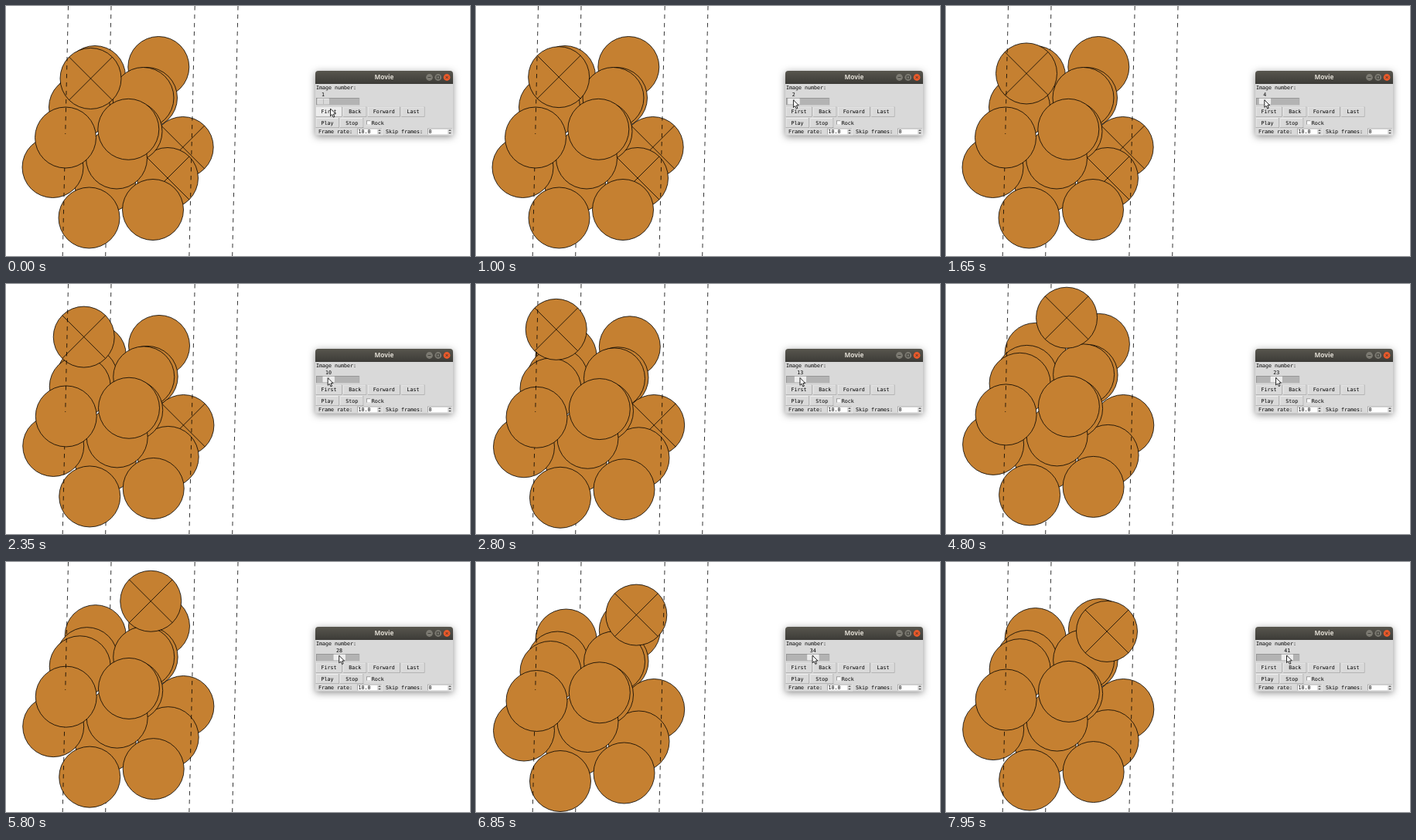
An HTML page with a canvas that plays this animation: 600 by 324 pixels, repeating every 8 s.

```html
<!DOCTYPE html>
<html lang="en">
<head>
<meta charset="utf-8">
<title>Movie</title>
<style>
html, body { margin: 0; width: 600px; height: 324px; overflow: hidden; background: #fff; }
canvas { display: block; }
</style>
</head>
<body>
<canvas id="stage" width="600" height="324"></canvas>
<script>
const ctx = document.getElementById('stage').getContext('2d');
const LOOP = 8000, STEP = 50, R = 39.5, COPPER = '#c58031';
const MONO = '6.65px "DejaVu Sans Mono", monospace';

// [time in ms, image number] while the slider is dragged
const DRAG = [[0, 1], [550, 1], [1650, 4], [3400, 18], [4800, 23], [6850, 34], [7950, 41]];

// rest positions, back to front; swing scales how strongly an atom vibrates
const BEHIND = [
  { x: 115, y: 91 },
  { x: 197.3, y: 79 },
  { x: 128, y: 229 },
  { x: 104, y: 120 },
  { x: 182, y: 119 },
  { x: 95, y: 131, swing: 2 },
  { x: 177.5, y: 119, swing: 1.5 },
  { x: 228.7, y: 183, swing: 0, crossUntil: 20 }
];
const FRONT_LEFT = { x: 77, y: 170.5 };
const BEFORE = [
  { x: 209, y: 223, crossUntil: 8 },
  { x: 162.5, y: 162.5 },
  { x: 143, y: 197.5 },
  { x: 60.5, y: 209 },
  { x: 107.5, y: 274.5 },
  { x: 190, y: 264 },
  FRONT_LEFT,
  { x: 158.3, y: 159.8 }
];

const clamp = (v, lo, hi) => Math.min(hi, Math.max(lo, v));
const ease = u => (1 - Math.cos(Math.PI * clamp(u, 0, 1))) / 2;
const bump = (n, center, width) => Math.exp(-(((n - center) / width) ** 2));

function along(points, t) {
  const i = points.findIndex(([time]) => time > t);
  if (i < 0) return points[points.length - 1][1];
  const [t0, v0] = points[i - 1], [t1, v1] = points[i];
  return v0 + (v1 - v0) * (t - t0) / (t1 - t0);
}

// the loose atom climbs over the cluster and settles on the right
const traveller = n => ({
  x: 154 + 54 * Math.sin(clamp((n - 22.7) / 8, -Math.PI / 2, Math.PI / 2)) + 9.5 * Math.exp((1 - n) / 3.5),
  y: 43.5 + 27 * (1 - Math.cos((n - 22) / 8))
});

// the others vibrate, then sink once it has passed
function place({ x, y, swing = 1 }, n) {
  const vibration = 2.6 * bump(n, 13, 3) - 3 * bump(n, 19, 4) + 1.5 * bump(n, 34, 4);
  return {
    x: x + 0.6 * ease((n - 4) / 10) + 0.9 * (bump(n, 13, 3) + bump(n, 34, 4)),
    y: y + 8 * ease((n - 23) / 10) + swing * vibration
  };
}

function line(x1, y1, x2, y2) {
  ctx.beginPath();
  ctx.moveTo(x1, y1);
  ctx.lineTo(x2, y2);
  ctx.stroke();
}

function disc(x, y, r, color) {
  ctx.beginPath();
  ctx.arc(x, y, r, 0, Math.PI * 2);
  ctx.fillStyle = color;
  ctx.fill();
}

function ball({ x, y }, crossed) {
  disc(x, y, R, COPPER);
  ctx.stroke();
  if (crossed) {
    const d = R * Math.SQRT1_2;
    line(x - d, y - d, x + d, y + d);
    line(x - d, y + d, x + d, y - d);
  }
}

function cellEdge(top, from = 0, to = 324) {
  const xAt = y => top - 7.3 * y / 324;
  ctx.setLineDash([5.5, 5.5]);
  ctx.lineDashOffset = from;
  line(xAt(from), from, xAt(to), to);
  ctx.setLineDash([]);
}

function cluster(n) {
  ctx.strokeStyle = '#000';
  ctx.lineWidth = 0.8;
  const draw = atom => ball(place(atom, n), n <= atom.crossUntil);
  cellEdge(136);
  cellEdge(300);
  BEHIND.forEach(draw);
  ball(traveller(n), true);
  BEFORE.forEach(draw);
  cellEdge(80.5, 0, 166);
  cellEdge(80.5, place(FRONT_LEFT, n).y + R);
  cellEdge(244.2);
}

function rect(x, y, w, h, color) {
  ctx.fillStyle = color;
  ctx.fillRect(x, y, w, h);
}

function bevel(x, y, w, h, face, light = '#f2f2f2', dark = '#9a9a9a') {
  rect(x, y, w, h, dark);
  rect(x, y, w - 0.8, h - 0.8, light);
  rect(x + 0.8, y + 0.8, w - 1.6, h - 1.6, face);
}

function label(text, x, y, align = 'left', font = MONO, color = '#000') {
  ctx.font = font;
  ctx.textAlign = align;
  ctx.textBaseline = 'middle';
  ctx.fillStyle = color;
  ctx.fillText(text, x, y);
}

function buttonRow(names, y, hovered) {
  let x = 400.6;
  for (const name of names) {
    const w = 14 + name.length * 4;
    bevel(x, y, w, 13, name === hovered ? '#ececec' : '#d9d9d9');
    label(name, x + w / 2, y + 6.8, 'center');
    x += w + 1.6;
  }
}

function spinbox(text, x) {
  bevel(x, 158.6, 33, 8.6, '#fff', '#999', '#eee');
  rect(x + 26, 159.4, 6, 7, '#d9d9d9');
  ctx.fillStyle = '#333';
  for (const dir of [-1, 1]) {
    const y = 162.9 + dir * 1.1;
    ctx.beginPath();
    ctx.moveTo(x + 27.2, y);
    ctx.lineTo(x + 30.8, y);
    ctx.lineTo(x + 29, y + dir * 1.6);
    ctx.fill();
  }
  label(text, x + 1.5, 163.2);
}

function titleBar() {
  ctx.save();
  ctx.shadowColor = 'rgba(0,0,0,.45)';
  ctx.shadowBlur = 10;
  ctx.shadowOffsetY = 2;
  ctx.fillStyle = '#d9d9d9';
  ctx.beginPath();
  ctx.roundRect(400, 84, 178, 83.5, [4, 4, 0, 0]);
  ctx.fill();
  ctx.restore();

  const shade = ctx.createLinearGradient(0, 84, 0, 101);
  shade.addColorStop(0, '#58564e');
  shade.addColorStop(1, '#3c3b37');
  ctx.fillStyle = shade;
  ctx.beginPath();
  ctx.roundRect(400, 84, 178, 17, [4, 4, 0, 0]);
  ctx.fill();
  label('Movie', 489, 93, 'center', 'bold 8.3px "Open Sans", sans-serif', '#dfdbd2');

  ['#7c7a72', '#7c7a72', '#e9592a'].forEach((color, i) => disc(547.5 + i * 11.3, 92.5, 4.4, color));
  ctx.strokeStyle = '#35342f';
  ctx.lineWidth = 0.8;
  line(545.5, 92.5, 549.5, 92.5);
  ctx.strokeRect(557.1, 90.8, 3.4, 3.4);
  line(568.5, 90.9, 571.7, 94.1);
  line(568.5, 94.1, 571.7, 90.9);
}

function pointer(x, y) {
  const shape = [[0, 0], [0, 9.6], [2.2, 7.6], [3.8, 11.2], [5.4, 10.5], [3.9, 7], [6.8, 6.8]];
  ctx.beginPath();
  shape.forEach(([dx, dy]) => ctx.lineTo(x + dx, y + dy));
  ctx.closePath();
  ctx.fillStyle = '#fff';
  ctx.fill();
  ctx.strokeStyle = '#111';
  ctx.lineWidth = 0.9;
  ctx.stroke();
}

function movieWindow(t, value, n) {
  const thumb = 410 + (n - 1) * 0.78;
  const reach = ease((t - 150) / 400);
  const tipX = 409.5 + (value - 1) * 0.775 + 10 * (1 - reach);
  const tipY = 133 - 11 * reach - t / LOOP;
  const onSlider = tipY < 129;

  titleBar();
  label('Image number:', 401, 105.8);
  label(String(n), thumb, 115.4, 'center');
  bevel(401, 119, 56.5, 9.8, '#b3b3b3', '#8f8f8f', '#c8c8c8');
  bevel(thumb - 7.5, 119.8, 16, 8.2, onSlider ? '#ececec' : '#d9d9d9', '#f2f2f2', '#b0b0b0');
  rect(thumb + 0.1, 120.6, 0.8, 6.6, '#b0b0b0');

  buttonRow(['First', 'Back', 'Forward', 'Last'], 130.6, onSlider ? '' : 'First');
  buttonRow(['Play', 'Stop'], 145);
  bevel(466, 148.4, 6, 6, '#fff', '#888', '#eee');
  label('Rock', 472.8, 151.8);

  label('Frame rate:', 404, 163.2);
  spinbox('10.0', 454);
  label('Skip frames:', 491, 163.2);
  spinbox('0', 545);
  pointer(tipX, tipY);
}

function frame(now) {
  const t = Math.floor((now % LOOP) / STEP) * STEP;
  const value = along(DRAG, t);
  const n = Math.round(value);
  rect(0, 0, 600, 324, '#fff');
  cluster(n);
  movieWindow(t, value, n);
}

const start = performance.now();
function tick() {
  frame(performance.now() - start);
  requestAnimationFrame(tick);
}
tick();
</script>
</body>
</html>
```
